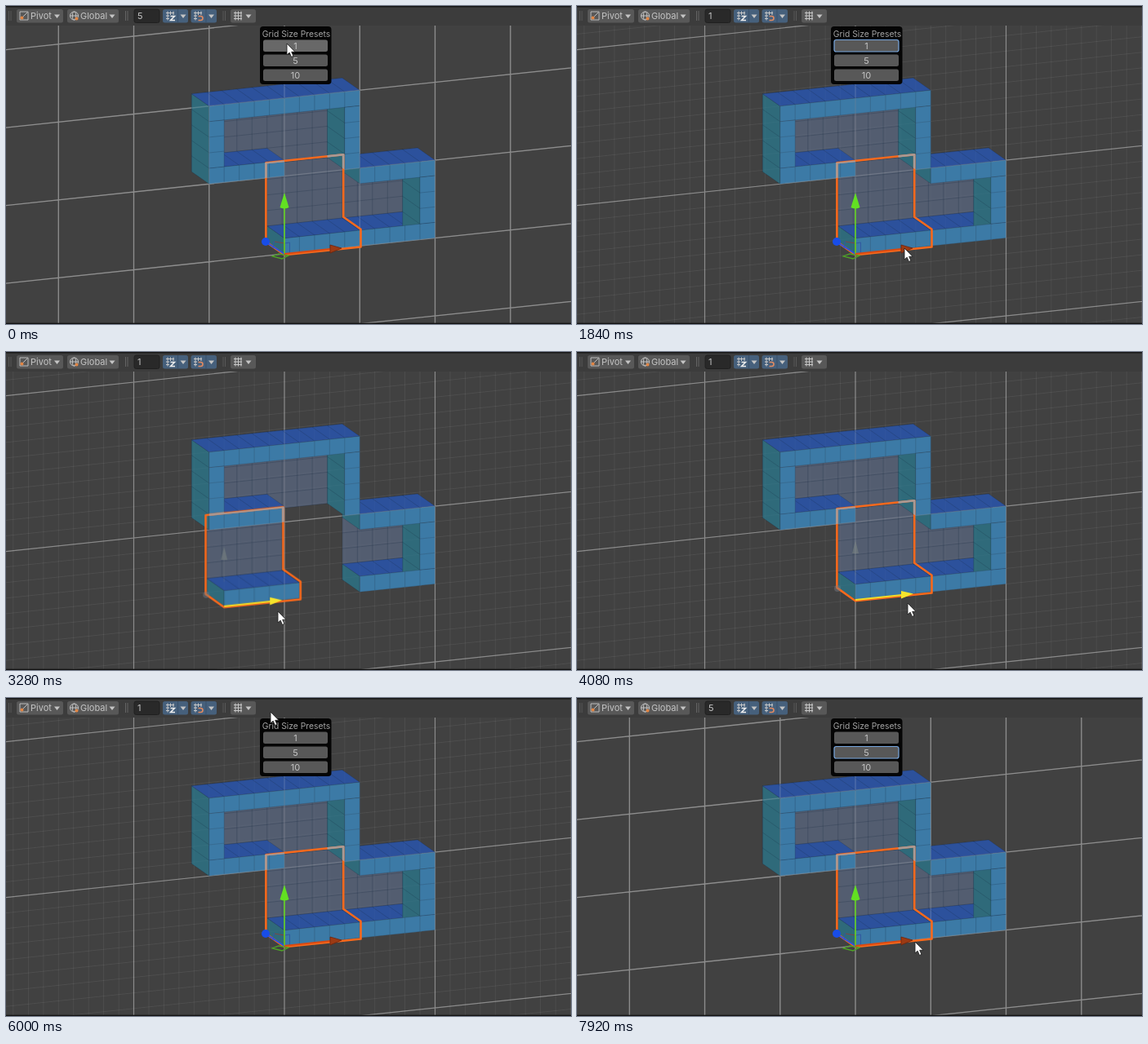
Write an HTML page that moves like this. It is 692 px wide and 390 px high and loops after 8 s.

```html
<!DOCTYPE html>
<html lang="en">
<head>
<meta charset="utf-8">
<title>Grid size presets</title>
<style>
  html, body { margin: 0; width: 100%; height: 100%; overflow: hidden; background: #414141; }
  svg { display: block; width: 692px; height: 390px; }
  text { font: 11px Inter, Roboto, sans-serif; fill: #c4c4c4; }
  .title { font-size: 10.3px; fill: #a4a4a4; }
  .mid { text-anchor: middle; }
  .btn { fill: #585858; }
  .on { fill: #46607c; }

  .fine, .coarse, .popup, .idle, .dragging, .handle, .one, .five, .ring1, .ring5 {
    animation: 8s step-end infinite;
  }
  .fine { animation-name: fine; }
  .coarse { animation-name: coarse; }
  .popup { animation-name: popup; }
  .idle { animation-name: idle; }
  .dragging { animation-name: dragging; }
  .handle { animation-name: handle; }
  .one { animation-name: one; }
  .five { animation-name: five; }
  .ring1 { animation-name: ring1; }
  .ring5 { animation-name: ring5; }
  .move { animation: move 8s infinite; }
  .cursor { animation: cursor 8s ease-in-out infinite; }

  @keyframes fine { 0%, 90%, 100% { visibility: hidden; } 3% { visibility: visible; } }
  @keyframes coarse { 0%, 90%, 100% { visibility: visible; } 3% { visibility: hidden; } }
  @keyframes popup { 0%, 69%, 100% { visibility: visible; } 24% { visibility: hidden; } }
  @keyframes idle { 0%, 53%, 100% { visibility: visible; } 24% { visibility: hidden; } }
  @keyframes dragging { 0%, 53%, 100% { visibility: hidden; } 24% { visibility: visible; } }
  @keyframes handle { 0%, 69%, 100% { fill: #585858; } 63% { fill: #a0a0a0; } }
  @keyframes one {
    0% { fill: #686868; } 1% { fill: #46607c; } 3% { fill: #686868; } 11% { fill: #585858; }
    78% { fill: #686868; } 80% { fill: #585858; } 100% { fill: #686868; }
  }
  @keyframes five {
    0%, 100% { fill: #585858; } 80% { fill: #686868; } 88% { fill: #46607c; }
    90% { fill: #686868; } 95.5% { fill: #585858; }
  }
  @keyframes ring1 { 0%, 24%, 100% { visibility: hidden; } 1% { visibility: visible; } }
  @keyframes ring5 { 0%, 100% { visibility: hidden; } 88% { visibility: visible; } }
  @keyframes move {
    0% { transform: none; }
    24% { transform: none; animation-timing-function: steps(7); }
    30.5%, 34% { transform: translate(-129.15px, 13.65px); animation-timing-function: steps(3); }
    40.5%, 42% { transform: translate(-73.8px, 7.8px); animation-timing-function: steps(4); }
    51%, 100% { transform: none; }
  }
  @keyframes cursor {
    0%, 10% { transform: translate(344px, 46px); }
    15% { transform: translate(559px, 344px); }
    20.5%, 24% { transform: translate(401px, 297px); animation-timing-function: linear; }
    30.5%, 34% { transform: translate(276px, 310px); animation-timing-function: linear; }
    40.5%, 42% { transform: translate(333px, 318px); animation-timing-function: linear; }
    51%, 54% { transform: translate(405px, 308px); }
    64%, 69% { transform: translate(298px, 11px); }
    75% { transform: translate(324px, 17px); }
    81%, 95% { transform: translate(381px, 65px); }
    99%, 99.99% { transform: translate(414px, 299px); }
    100% { transform: translate(344px, 46px); }
  }
</style>
</head>
<body>
<svg viewBox="0 0 692 390">
  <defs>
    <clipPath id="cover"><path id="coverShape"/></clipPath>
    <path id="tri" d="M-3.5-2h7L0 2.5z" fill="#c4c4c4"/>
    <path id="hash" d="M-5-3H5M-5 0.5H5M-5 4H5M-3-5V6M0.5-5V6M4-5V6" fill="none" stroke="#c8c8c8"/>
    <g id="bars"><rect width="1" height="12"/><rect x="2.5" width="1" height="12"/></g>
  </defs>

  <rect width="692" height="390" fill="#414141"/>
  <g id="scene"></g>

  <g class="move">
    <g transform="translate(341 304)">
      <g class="idle" fill="none">
        <path d="M0 0L6.500-1V-14L0-13zM0-13L-13-15L-14-7" stroke="#3159a0"/>
        <path d="M0 0V-13L-12-15" stroke="#7c4a40"/>
        <path d="M-15 3L-7 0L5 2L-3 6z" stroke="#4fa526" stroke-width="1.300"/>
        <path d="M0 0L-22-14" stroke="#2450e8" stroke-width="1.800"/>
        <circle cx="-23" cy="-15" r="5" fill="#184de8"/>
        <path d="M0 0V-57" stroke="#63d320" stroke-width="1.600"/>
        <path d="M0-75L-5.500-57Q0-54 5.500-57z" fill="#62e022"/>
        <path d="M0 0L56-6" stroke="#d94a12" stroke-width="1.800"/>
        <path d="M70-7L56-11V-1z" fill="#9c3a14" stroke="#6e240c" stroke-width="0.800"/>
      </g>
      <g class="dragging">
        <path d="M0-57V-30" stroke="#7d8580" opacity="0.250"/>
        <path d="M0-73L-4-57H4z" fill="#858d87" opacity="0.450"/>
        <circle cx="-22" cy="-14" r="4" fill="#777d84" opacity="0.450"/>
        <path d="M0 0L57-6" stroke="#f2dc28" stroke-width="2"/>
        <path d="M71-7.500L56-11V-1.500z" fill="#f5e52c"/>
      </g>
    </g>
  </g>

  <g id="toolbar">
    <rect width="692" height="24" fill="#3c3c3c"/>
    <rect width="692" height="1.500" fill="#161616"/>
    <use href="#bars" x="3" y="6" fill="#585858"/>
    <use href="#bars" x="146" y="6" fill="#646464"/>
    <use href="#bars" x="265.500" y="6" class="handle"/>

    <rect class="btn" x="13" y="4" width="57" height="16.500" rx="2.500"/>
    <path d="M17 7H27V17H17zM20 14L26 8" fill="none" stroke="#bdbdbd"/>
    <circle cx="19.500" cy="14.500" r="2" fill="#e08545"/>
    <text x="30" y="16.300">Pivot</text>
    <use href="#tri" x="62.500" y="12.500"/>

    <rect class="btn" x="75" y="4" width="63" height="16.500" rx="2.500"/>
    <g fill="none" stroke="#c4c4c4">
      <circle cx="83.500" cy="12" r="5"/>
      <ellipse cx="83.500" cy="12" rx="2.200" ry="5"/>
      <path d="M78.500 12H88.500"/>
    </g>
    <circle cx="86.500" cy="15.500" r="2" fill="#e08545"/>
    <text x="91" y="16.300">Global</text>
    <use href="#tri" x="130" y="12.500"/>

    <rect x="157" y="4" width="31" height="16.500" rx="2.500" fill="#292929" stroke="#202020"/>
    <text class="coarse" x="161" y="16.300">5</text>
    <text class="fine" x="161" y="16.300">1</text>

    <rect class="on" x="192" y="4" width="31" height="16.500" rx="2.500"/>
    <use href="#hash" x="201" y="11.500"/>
    <rect x="200" y="11" width="8" height="8" fill="#46607c"/>
    <path d="M201.500 12.500H206.500L201.500 17.500H207" fill="none" stroke="#eee" stroke-width="1.500"/>
    <path d="M210.500 4V20.500" stroke="#38506a"/>
    <use href="#tri" x="217" y="12.500"/>

    <rect class="on" x="226.500" y="4" width="31.500" height="16.500" rx="2.500"/>
    <use href="#hash" x="235" y="11.500"/>
    <rect x="234" y="11" width="8" height="8" fill="#46607c"/>
    <path d="M235.500 12.500H238.500A2.300 2.300 0 0 1 238.500 17.500H235.500" fill="none" stroke="#e08a62" stroke-width="1.600"/>
    <path d="M245 4V20.500" stroke="#38506a"/>
    <use href="#tri" x="251.500" y="12.500"/>

    <rect class="btn" x="275" y="4" width="31" height="16.500" rx="2.500"/>
    <use href="#hash" x="284" y="11.500"/>
    <use href="#tri" x="297" y="12.500"/>
  </g>

  <g class="popup">
    <rect x="311" y="25" width="87.500" height="71" rx="4" fill="#050505"/>
    <text class="title mid" x="355.500" y="37.600">Grid Size Presets</text>
    <rect class="one" x="315" y="41.500" width="79" height="14.500" rx="2.500"/>
    <rect class="five" x="315" y="59.500" width="79" height="14.500" rx="2.500"/>
    <rect class="btn" x="315" y="77.500" width="79" height="14.500" rx="2.500"/>
    <g fill="none" stroke="#78a7df" stroke-width="1.200">
      <rect class="ring1" x="315" y="41.500" width="79" height="14.500" rx="2.500"/>
      <rect class="ring5" x="315" y="59.500" width="79" height="14.500" rx="2.500"/>
    </g>
    <text class="mid" x="354.500" y="52.800">1</text>
    <text class="mid" x="354.500" y="70.800">5</text>
    <text class="mid" x="354.500" y="88.800">10</text>
  </g>

  <rect y="388.700" width="692" height="1.300" fill="#111"/>
  <path class="cursor" d="M0 0V14L3.200 11.200L5.500 16.500L8 15.400L5.700 10.300H10z" fill="#fff" stroke="#222" stroke-width="0.900"/>
</svg>

<script>
(() => {
  const scene = document.getElementById('scene');

  // Oblique projection: x runs right, y up, z away from the viewer.
  const point = (x, y, z = 0) => [
    341 + 18.45 * x - 21.3 * z,
    304 - 1.95 * x - 19.1 * y - 15 * z
  ].map(n => n.toFixed(1)).join(' ');

  const poly = pts => 'M' + pts.map(p => point(...p)).join('L') + 'z';
  const line = (a, b) => `M${point(...a)}L${point(...b)}`;

  // A face spans two axes; its cell lines follow the unit steps.
  function face(origin, axisU, nu, axisV, nv, fill) {
    const at = (u, v) => origin.map((n, i) => n + (i === axisU ? u : 0) + (i === axisV ? v : 0));
    let cells = '';
    for (let u = 0; u <= nu; u++) cells += line(at(u, 0), at(u, nv));
    for (let v = 0; v <= nv; v++) cells += line(at(0, v), at(nu, v));
    const edge = poly([at(0, 0), at(nu, 0), at(nu, nv), at(0, nv)]);
    return `<path d="${edge}" fill="${fill}"/>` +
      `<path d="${cells}" stroke="#13283c" stroke-opacity=".28" stroke-width=".8"/>`;
  }

  const front = (x, y, w, h) => face([x, y, 0], 0, w, 1, h, '#3c7aa6');
  const lid = (x, y, w) => face([x, y, 0], 0, w, 2, 1, '#2c519c');
  const side = (x, y, h) => face([x, y, 0], 2, 1, 1, h, '#2f6a7a');
  const wall = (x, y, w, h) => face([x, y, 1], 0, w, 1, h, '#535d70');

  const right = wall(5, 0, 5, 5) + lid(5, 1, 5) + side(9, 0, 5) + side(5, 0, 1) + side(5, 4, 1) +
    lid(5, 5, 5) + front(5, 4, 5, 1) + front(9, 1, 1, 3) + front(5, 0, 5, 1);
  const upper = wall(-5, 5, 10, 5) + lid(-5, 6, 5) + side(4, 5, 5) + side(-5, 5, 5) +
    lid(-5, 10, 10) + front(-5, 9, 10, 1) + front(-5, 6, 1, 3) + front(4, 5, 1, 4) + front(-5, 5, 5, 1);
  const picked = wall(0, 0, 5, 5) + lid(0, 1, 5) + side(0, 0, 1) + front(0, 0, 5, 1);

  function gridPath(step, rowShift = 0) {
    let d = '';
    for (let i = -20; i <= 20; i += step) {
      d += line([i, -12], [i, 22]) + line([-20, i + rowShift], [20, i + rowShift]);
    }
    return d;
  }

  const grid = (major, minor) => `
    <g fill="none" stroke="#e4e4e4">
      <path class="coarse" d="${gridPath(5)}" stroke-width="1.3" opacity="${major}"/>
      <g class="fine">
        <path d="${gridPath(1)}" stroke-width=".9" opacity="${minor}"/>
        <path d="${gridPath(10, 5)}" stroke-width="1.2" opacity="${major * 0.85}"/>
      </g>
    </g>`;

  const e = 0.07;
  const ring = poly([
    [0, -e, 0], [5 + e, -e, 0], [5 + e, 1 + e, 0], [5 + e, 1 + e, 1],
    [5 + e, 5 + e, 1], [-e, 5 + e, 1], [-e, 0, 1]
  ]);
  const outline = color =>
    `<g class="move"><path d="${ring}" fill="none" stroke="${color}" stroke-width="2.6" stroke-linejoin="round"/></g>`;

  // Parts of the fixed blocks that stand in front of the selection.
  document.getElementById('coverShape').setAttribute('d',
    poly([[-5, 5, 0], [0, 5, 0], [0, 6, 0], [-4, 6, 0], [-4, 9, 0], [-5, 9, 0]]) +
    poly([[4, 5, 1], [4, 5, 0], [5, 5, 0], [5, 9, 0], [4, 9, 1]]));

  scene.innerHTML = grid(0.34, 0.06) + right + `<g class="move">${picked}</g>` + upper +
    grid(0.2, 0.03) + outline('#f8691c') +
    `<g clip-path="url(#cover)">${outline('#a99a96')}</g>`;
})();
</script>
</body>
</html>
```
